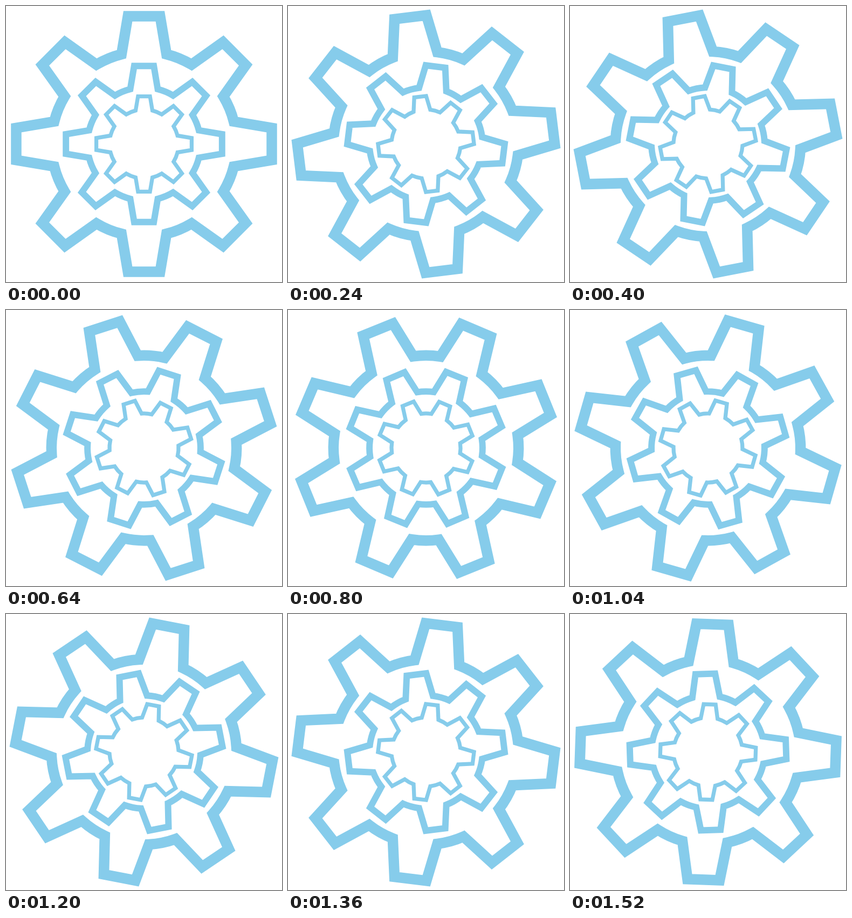
Animation, 512 px wide and 512 px high, one loop 1.6 s. Source, as an HTML page with a canvas:

```html
<!DOCTYPE html>
<html lang="en">
<head>
<meta charset="utf-8">
<title>Nested gears</title>
<style>
  html, body { margin: 0; width: 100%; height: 100%; overflow: hidden; background: #fff; }
  canvas { display: block; }
</style>
</head>
<body>
<canvas id="stage" width="512" height="512"></canvas>
<script>
const ctx = document.getElementById('stage').getContext('2d');
const DEG = Math.PI / 180;
const TEETH = 8, PITCH = 360 / TEETH;
const LOOP = 1600, STEPS = 20;
const TIP = { radius: 238.9, angle: 7.17 };
const ROOT = { radius: 171.7, angle: 14.06 };

function gearPath() {
  const path = new Path2D();
  const tip = deg => path.lineTo(TIP.radius * Math.cos(deg * DEG), TIP.radius * Math.sin(deg * DEG));
  for (let i = 0; i < TEETH; i++) {
    const mid = i * PITCH;
    tip(mid - TIP.angle);
    tip(mid + TIP.angle);
    path.arc(0, 0, ROOT.radius, (mid + ROOT.angle) * DEG, (mid + PITCH - ROOT.angle) * DEG);
  }
  path.closePath();
  return path;
}

const gear = gearPath();

function drawGear(scale, degrees) {
  ctx.save();
  ctx.translate(256, 256);
  ctx.rotate(degrees * DEG);
  ctx.scale(scale, scale);
  ctx.stroke(gear);
  ctx.restore();
}

function draw() {
  // The gears advance one tooth per loop, in steps of whole degrees.
  const step = Math.floor(performance.now() % LOOP / LOOP * STEPS);
  const turn = Math.ceil(step / STEPS * PITCH - 0.5);
  ctx.clearRect(0, 0, 512, 512);
  ctx.strokeStyle = '#86cceb';
  ctx.lineWidth = 19.5;
  drawGear(1, -turn);
  drawGear(0.611, turn);
  drawGear(0.373, -turn);
  requestAnimationFrame(draw);
}
draw();
</script>
</body>
</html>
```
